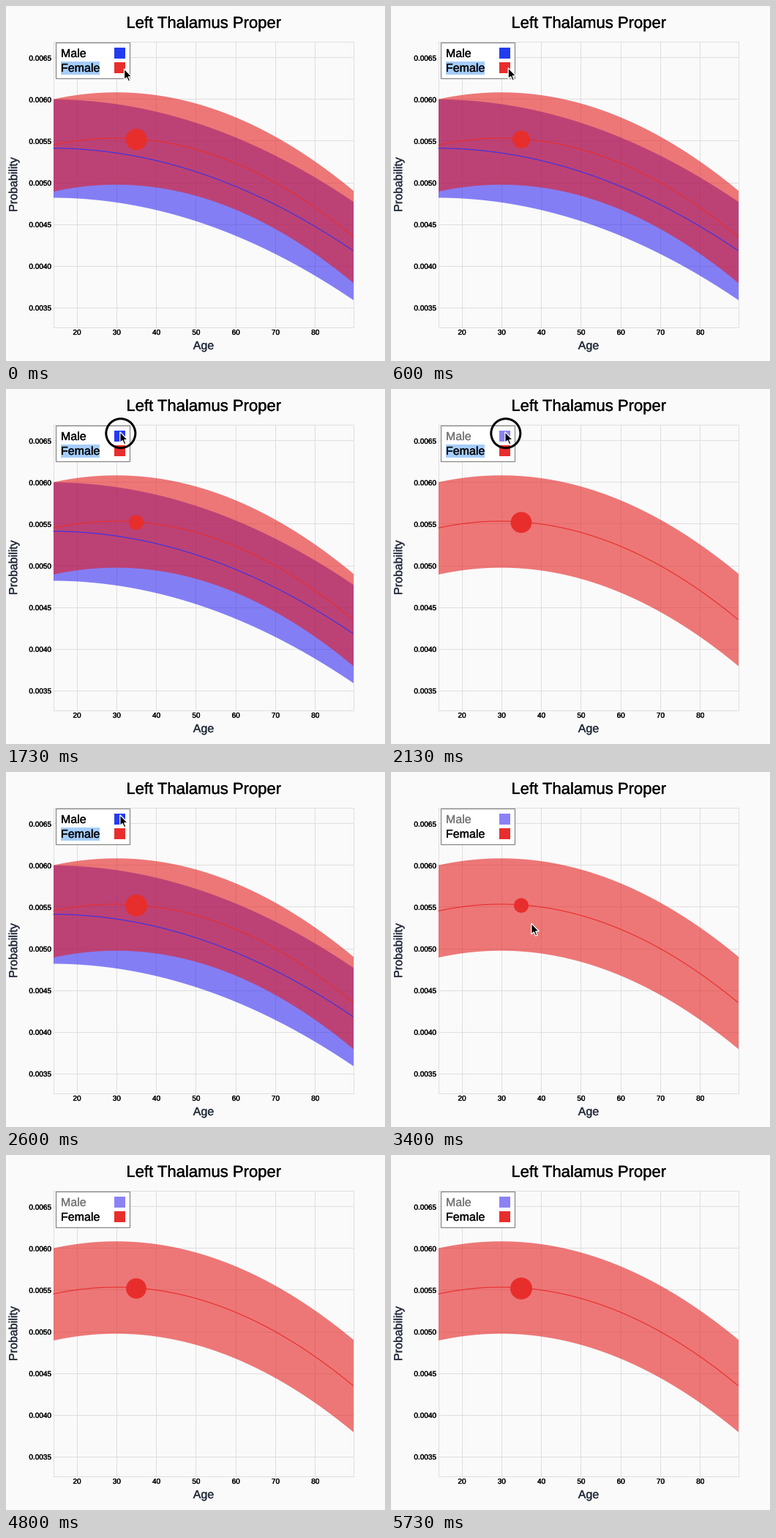
A matplotlib script that plays this animation: 518x486 px, repeating every 5790 ms.

```python
import numpy as np
import matplotlib.pyplot as plt
from matplotlib.animation import FuncAnimation
from matplotlib.patches import Circle, Polygon, Rectangle
from matplotlib.patheffects import withStroke

W, H, DPI = 518, 486, 100
LOOP, STEP = 5790, 30
TICK = 200 / 3  # the picture is refreshed 15 times a second

BG, GRID, INK = "#fafafa", "#dedede", "#252d3d"
RED, BLUE, FADED = "#e82e2c", "#233bf0", "#8a82f5"
LEFT, RIGHT, TOP, BOTTOM = 64.5, 474.5, 49.5, 439.5

plt.rcParams["font.family"] = "Liberation Sans"
plt.rcParams["text.hinting"] = "none"
fig = plt.figure(figsize=(W / DPI, H / DPI), dpi=DPI, facecolor=BG)
ax = fig.add_axes([0, 0, 1, 1])
ax.set_xlim(0, W)
ax.set_ylim(H, 0)
ax.axis("off")


def px(n):
    return n * 72 / DPI


def text(x, y, s, size, color="black", **kw):
    kw = {"ha": "left", "va": "baseline", **kw}
    bolder = [withStroke(linewidth=px(0.3), foreground=color)]
    return ax.text(x, y, s, fontsize=px(size), color=color,
                   path_effects=bolder, **kw)


def rect(x, y, w, h, **kw):
    return ax.add_patch(Rectangle((x, y), w, h, **kw))


def line(xs, ys, color, width, z):
    return ax.plot(xs, ys, color=color, lw=px(width), zorder=z,
                   solid_capstyle="butt")[0]


# Grid, ticks and titles
for age in range(20, 90, 10):
    x = 96.5 + (age - 20) * 5.43
    line([x, x], [TOP, BOTTOM], GRID, 1, 1)
    text(x + 0.5, 450, str(age), 10, ha="center")
for i in range(7):
    y = 70.5 + 57 * i
    line([LEFT, RIGHT], [y, y], GRID, 1, 1)
    text(62, y + 4.3, f"{0.0065 - 0.0005 * i:.4f}", 10, ha="right")
rect(LEFT + 0.5, TOP, RIGHT - LEFT, BOTTOM - TOP,
     fill=False, ec=GRID, lw=px(1), zorder=1)
text(270, 30, "Left Thalamus Proper", 22.05, ha="center")
text(270, 470, "Age", 16, INK, ha="center")
text(18.5, 244.5, "Probability", 16, INK, ha="right", va="center",
     rotation=90)

# Fitted parabolas, each with a band of constant height
xs = np.linspace(LEFT, RIGHT, 200)


def series(start, end, peak, half, fill, alpha, color, z):
    k = (end - start) / ((RIGHT - peak) ** 2 - (LEFT - peak) ** 2)
    mid = start + k * ((xs - peak) ** 2 - (LEFT - peak) ** 2)
    band = ax.fill_between(xs, mid - half, mid + half, color=fill,
                           alpha=alpha, lw=0, zorder=z)
    return band, line(xs, mid, color, 1.15, 4)


male = series(194.7, 335, 62, 67.3, "#352bf2", 0.6, "#3a32e6", 2)
series(190.3, 315.8, 150, 63.2, "#e51818", 0.58, RED, 3)
dot = ax.add_patch(Circle((178, 182.7), 15, fc=RED, lw=0, zorder=5))

# Legend
rect(67.5, 50, 101, 49.5, fc="white", ec="#858585", lw=px(1.2), zorder=6)
select = rect(75, 76, 53, 18, fc="#a5cdfb", lw=0, zorder=7)


def entry(y, name, color):
    box = rect(147.7, y - 13.3, 15.5, 15.5, fc=color, lw=0, zorder=8)
    return text(75, y, name, 16, zorder=8), box


male_text, male_box = entry(70, "Male", BLUE)
entry(90, "Female", RED)

# Pointer
ARROW = np.array([(0, 0), (0, 15), (3.4, 11.8), (5.8, 17.2), (8.2, 16.2),
                  (5.9, 10.9), (10.6, 10.9)])
arrow = ax.add_patch(Polygon(ARROW, fc="black", ec="white", lw=px(1.3),
                             zorder=11))
ring = ax.add_patch(Circle((157, 61), 20, fill=False, ec="black", lw=px(3),
                           zorder=10))

HOME = np.array([161.5, 86])
MOVES = [(400, 500, (-5, -5)), (1250, 320, (-0.7, -22.3)),
         (2930, 420, (36, 148.5))]  # start, duration, shift
CLICK, GAP, HOLD, COUNT = 1620, 500, 130, 3
HIDE = 3930
PULSE, PEAK = 530, 460


def cubic(p):
    p = np.clip(p, 0, 1)
    return 4 * p ** 3 if p < 0.5 else 1 - 4 * (1 - p) ** 3


def clicks(t):
    """Number of mouse presses made by time t."""
    return int(np.clip((t - CLICK) // GAP + 1, 0, COUNT))


def radius(t):
    half = PULSE / 2
    away = abs((t - PEAK + half) % PULSE - half)
    return 15 - 5 * cubic(away / half)


def draw(i):
    t = round(i * STEP / TICK) * TICK
    dot.set_radius(radius(t))

    pressed, released = clicks(t), clicks(t - HOLD)
    shown = released % 2 == 0
    for part in male:
        part.set_visible(shown)
    ink = "black" if shown else "#777777"
    male_text.set_color(ink)
    male_text.set_path_effects([withStroke(linewidth=px(0.3),
                                           foreground=ink)])
    male_box.set_facecolor(BLUE if shown else FADED)
    select.set_visible(pressed < COUNT)

    tip = HOME + sum(cubic((t - start) / span) * np.array(shift)
                     for start, span, shift in MOVES)
    arrow.set_xy(ARROW + tip)
    arrow.set_visible(t < HIDE)
    ring.center = tip + (1, 2)
    ring.set_visible(pressed > released)
    return []


anim = FuncAnimation(fig, draw, frames=LOOP // STEP, init_func=lambda: [],
                     interval=STEP, repeat=True, repeat_delay=0)
plt.show()
```
